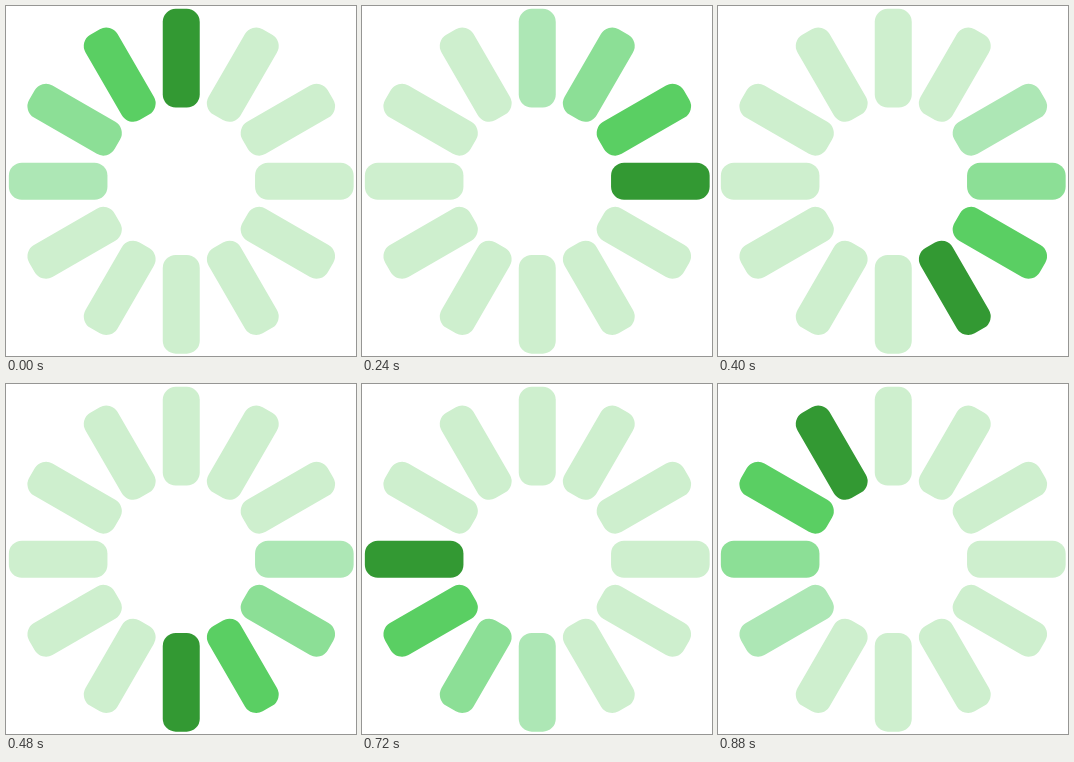
Write an HTML page that moves like this. It is 350 by 350 pixels and loops after 960 ms.

```html
<!DOCTYPE html>
<html lang="en">
<head>
<meta charset="utf-8">
<title>Spinner</title>
<style>
  html, body { margin: 0; width: 100%; height: 100%; overflow: hidden; background: #fff; }
  svg { display: block; width: 350px; height: 350px; }
  rect {
    fill: #ceefce;
    animation: fade 960ms step-end infinite;
    animation-delay: calc(var(--i) * 80ms - 960ms);
  }
  @keyframes fade {
    0% { fill: #339933; }
    8.333% { fill: #5acf63; }
    16.666% { fill: #8cdf96; }
    25% { fill: #ade7b5; }
    33.333%, 100% { fill: #ceefce; }
  }
</style>
</head>
<body>
<svg viewBox="0 0 350 350"><g id="bars" transform="translate(175.25 175.25)"></g></svg>
<script>
  const bars = document.getElementById('bars');
  for (let i = 0; i < 12; i++) {
    const bar = document.createElementNS('http://www.w3.org/2000/svg', 'rect');
    const attrs = { x: -18.5, y: -172.4, width: 37, height: 98.6, rx: 13, transform: `rotate(${i * 30})` };
    for (const key in attrs) bar.setAttribute(key, attrs[key]);
    bar.style.setProperty('--i', i);
    bars.append(bar);
  }
</script>
</body>
</html>
```
